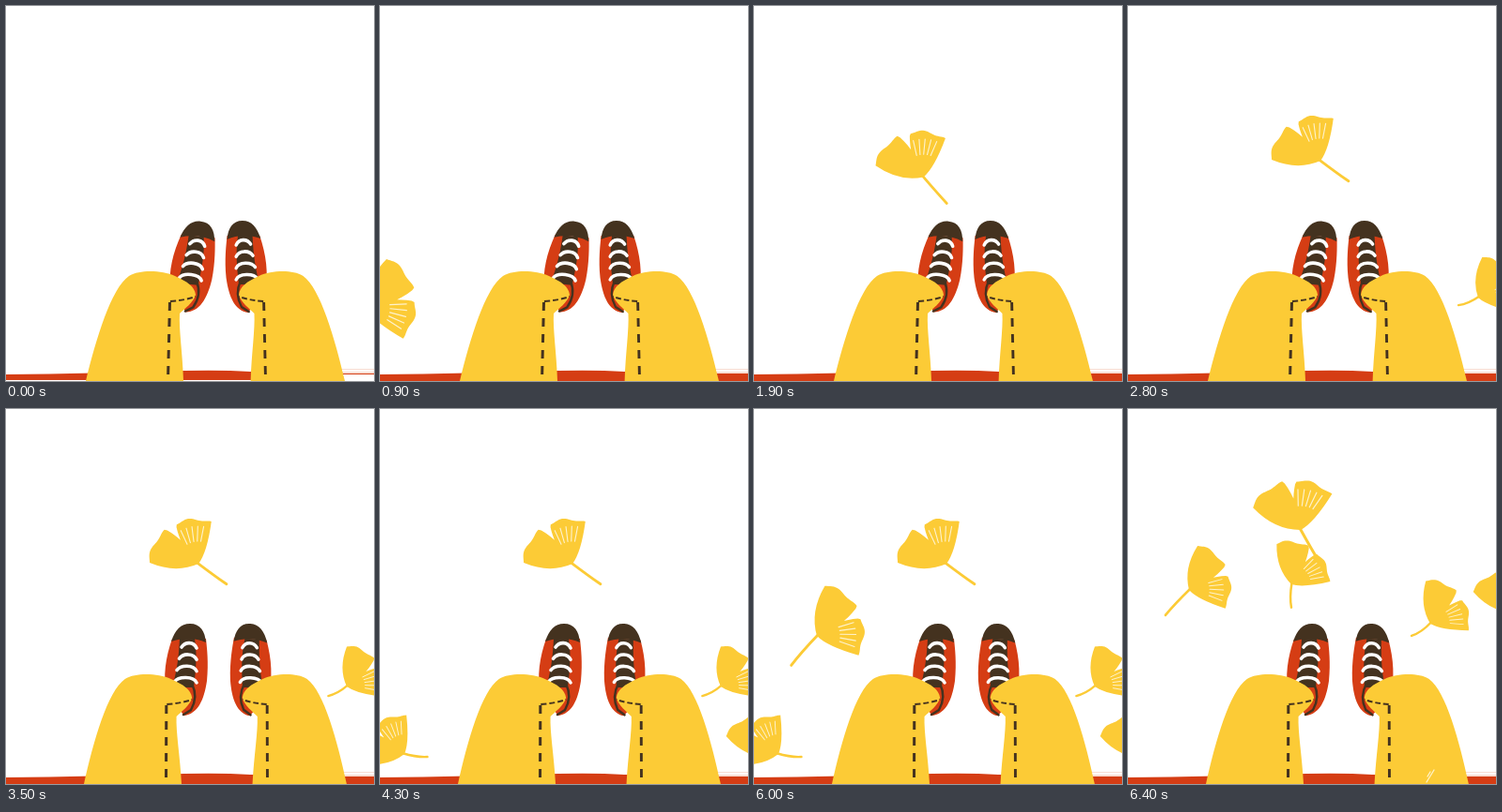
An HTML page with a canvas that plays this animation: 392x400 px, repeating every 6.5 s.

```html
<!DOCTYPE html>
<html lang="en">
<head>
<meta charset="utf-8">
<title>Falling ginkgo leaves</title>
<style>
html, body { margin: 0; width: 100%; height: 100%; overflow: hidden; background: #fff; }
canvas { display: block; width: 392px; height: 400px; }
</style>
</head>
<body>
<canvas id="stage" width="392" height="400"></canvas>
<script>
const ctx = document.getElementById('stage').getContext('2d');
const YELLOW = '#fccb36', RED = '#d53d14', DARK = '#44321f', WHITE = '#fff';
const LOOP = 6500, STEP = 100, GUST_START = 6200, GUST_END = 6400;

const rad = deg => deg * Math.PI / 180;
const progress = (t, start, end) => Math.min(1, Math.max(0, (t - start) / (end - start)));
const easeOut = u => 1 - (1 - u) ** 2;
const mix = (a, b, k) => a.map((v, i) => v + (b[i] - v) * k);
const polar = (deg, r) => [r * Math.sin(rad(deg)), -r * Math.cos(rad(deg))];

function fill(path, color) {
  ctx.fillStyle = color;
  ctx.fill(new Path2D(path));
}

function stroke(path, color, width, dash = []) {
  ctx.strokeStyle = color;
  ctx.lineWidth = width;
  ctx.lineCap = dash.length ? 'butt' : 'round';
  ctx.setLineDash(dash);
  ctx.stroke(new Path2D(path));
}

// Draws inside a saved state, so transforms do not leak.
function isolated(drawing) {
  ctx.save();
  drawing();
  ctx.restore();
}

// A rippled fan with one notch; the origin is where the stem joins.
function makeBlade() {
  const first = -37, last = 69;
  const rim = [];
  for (let a = first; a <= last; a += 2) {
    const notch = 18 * Math.max(0, 1 - Math.abs(a - 15) / 7);
    const radius = 53 - 7 * (a - first) / (last - first) + 1.2 * Math.sin(a / 5);
    rim.push(polar(a, radius - notch));
  }
  return `M0,0 Q-23,-12 ${rim.join(' L')} Q15,0 0,0Z`;
}

function makeVeins() {
  let path = '';
  for (let a = 24; a <= 60; a += 9) path += `M${polar(a, 40)} L${polar(a - 2, 24)}`;
  return path;
}

const BLADE = makeBlade(), VEINS = makeVeins();

// Poses are x, y, angle, scale: drift in, rest, then the closing gust.
const leaves = [
  { enter: 700, settle: 2400, stem: 37, bend: -2,
    from: [-78, 367, 92, 1.12], rest: [205, 165, -52, 1], blown: [184, 129, -28, 1.08] },
  { enter: 2200, settle: 3200, stem: 27, bend: 26,
    from: [425, 390, 73, .9], rest: [363, 296, 37, .82], blown: [322, 229, 31, .88] },
  { enter: 3600, settle: 4300, stem: 28, bend: -17,
    from: [-60, 400, -90, .9], rest: [26, 368, -66, .88], blown: [174, 187, 17, .88] },
  { enter: 3700, settle: 4300, stem: 30, bend: 0,
    from: [450, 400, -50, .9], rest: [410, 371, -25, .9], blown: [409, 217, -25, .9] },
  { enter: 5000, settle: 6000, stem: 40, bend: -5,
    from: [-180, 528, 75, 2.6], rest: [67, 242, 46, 1.04], blown: [65, 193, 48, .92] }
];

function drawLeaf({ enter, settle, stem, bend, from, rest, blown }, t) {
  if (t < enter) return;
  const calm = mix(from, rest, easeOut(progress(t, enter, settle)));
  const [x, y, angle, scale] = mix(calm, blown, progress(t, GUST_START, GUST_END) ** 3);
  const [endX, endY] = polar(bend + 180, stem);
  isolated(() => {
    ctx.translate(x, y);
    ctx.rotate(rad(angle));
    ctx.scale(scale, scale);
    stroke(`M0,-2 Q${endX * .3},${endY * .6} ${endX},${endY}`, YELLOW, 2.8);
    fill(BLADE, YELLOW);
    stroke(VEINS, 'rgba(255,255,255,.75)', 1.1);
  });
}

// Upright shoe with its heel at the origin.
function drawShoe() {
  fill('M-17,-80 C-24,-60 -27,-40 -23,-20 L-4,2 C10,0 17,-14 20,-35 C22,-55 20,-70 19,-80Z', RED);
  fill('M-9,-80 L7,-80 C10,-62 8,-45 6,-28 L-17,-28 C-12,-45 -10,-60 -9,-80Z', DARK);
  fill('M-18,-77 C-14,-89 -8,-96 2,-96 C13,-96 18,-88 19,-76 C8,-81 -6,-81 -18,-77Z', DARK);
  stroke('M4,-32 Q11,-18 3,-4 L-5,1', DARK, 2.5);
  for (let i = 0; i < 4; i++) {
    const x = -7 - 2.5 * i, y = -71 + 12.3 * i;
    stroke(`M${x},${y} C${x + 4},${y - 6} 6,${y - 6} 9,${y + 1}`, WHITE, 3.6);
  }
}

// Left leg; the right one is its mirror image.
function drawLeg(shoeAngle, sway) {
  isolated(() => {
    ctx.translate(196 - 2 * sway, 325);
    ctx.rotate(rad(shoeAngle));
    drawShoe();
  });
  isolated(() => {
    const lean = .02 * sway;
    ctx.transform(1, 0, lean, 1, -400 * lean - 2 * sway, 0);
    fill(`M85,400 C96,355 112,301 131,288 C143,281 166,282 180,288 C193,294 201,299 202,308
      C200,316 190,323 185,328 C184,345 188,370 189,400Z`, YELLOW);
    stroke('M174.5,316 L172.5,400', DARK, 3, [9, 8]);
    stroke('M175,315 Q190,314 202,310', DARK, 2, [6, 3]);
  });
}

function drawLegs(t) {
  const sway = progress(t, 3000, 3300);
  drawLeg(5.5 * (1 - sway), sway);
  isolated(() => {
    ctx.transform(-.965, 0, 0, 1, 443, 0);
    drawLeg(-4 * sway, sway);
  });
}

function drawGround(t) {
  const still = t < 800;
  fill('M0,393 Q90,392 190,389 Q230,388 260,390 L392,392 V400 H0Z', RED);
  fill('M355,387 H392 V392 H355Z', '#f8ddd2');
  stroke('M358,389 H392', WHITE, 2);
  if (still) fill('M0,399 H357 V393 H392 V400 H0Z', WHITE);
}

function draw(t) {
  ctx.clearRect(0, 0, 392, 400);
  drawGround(t);
  for (const leaf of leaves) drawLeaf(leaf, t);
  drawLegs(t);
  if (t >= GUST_END) stroke('M326,385 L318,398 M322,387 L319,392', '#fff3c8', 1.3);
}

function tick() {
  const t = performance.now() % LOOP;
  draw(Math.floor(t / STEP) * STEP);
  requestAnimationFrame(tick);
}
tick();
</script>
</body>
</html>
```
